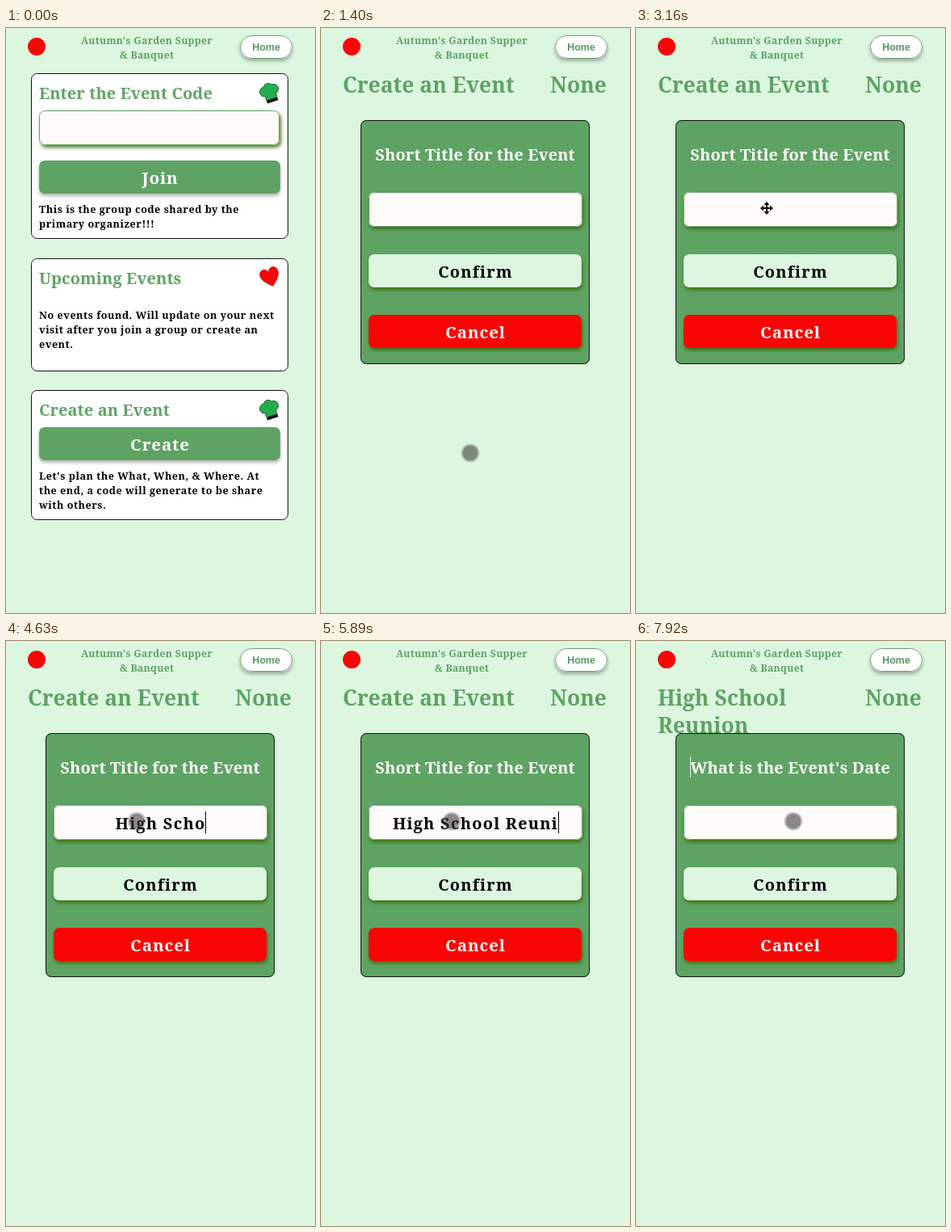
These frames come from a looping animation (383x724 px, 7990 ms). An HTML page with a canvas:

```html
<!DOCTYPE html>
<html lang="en">
<head>
<meta charset="utf-8">
<title>Event planner</title>
<style>
html, body { margin: 0; width: 100%; height: 100%; overflow: hidden; background: #dcf6e0; }
canvas { display: block; }
</style>
</head>
<body>
<canvas id="stage" width="383" height="724"></canvas>
<script>
const ctx = document.getElementById('stage').getContext('2d');
const LOOP = 7990;
const MINT = '#dcf6e0', GREEN = '#5ea364', SNOW = '#fffafa', RED = '#fa0505';
const OLIVE = 'rgba(58,105,0,.85)', SOFT = 'rgba(0,0,0,.3)';
const SERIF = '"Noto Serif", serif';

// size and letter spacing of each text style
const STYLES = {
  brand: [12.3, 0.25], heading: [20, 0.1], body: [12.6, 0.53],
  button: [20.5, 0.9], entry: [20, 1.2], page: [26.5, 0], home: [12.5, 0]
};

// moment at which each letter is typed
const TITLE = 'High School Reunion';
const KEYS = [3290, 3430, 3630, 3700, 3830, 4230, 4300, 4440, 4630, 4830,
  4970, 5090, 5210, 5400, 5560, 5760, 5890, 6030, 6100];

// pointer path: time, x, y
const PATH = [
  [190, 255, 693], [400, 238, 632], [600, 210, 568], [800, 191, 535], [940, 185, 526],
  [1540, 185, 526], [1680, 166, 440], [1820, 131, 340], [1890, 125, 312], [1960, 130, 276],
  [2020, 150, 248], [2150, 159, 230], [2290, 162, 223],
  [7030, 162, 223], [7170, 165, 252], [7300, 171, 296], [7370, 173, 309],
  [7580, 173, 309], [7720, 182, 268], [7850, 192, 235], [7920, 195, 223]
];

const within = (t, from, to) => t >= from && t < to;

function setStyle(name) {
  const [size, spacing] = STYLES[name];
  const family = name === 'home' ? '"Liberation Sans", Arial, sans-serif' : SERIF;
  ctx.font = `bold ${size}px ${family}`;
  ctx.letterSpacing = spacing + 'px';
}

function text(str, x, y, style, color, align = 'left') {
  setStyle(style);
  ctx.fillStyle = color;
  ctx.textAlign = align;
  ctx.fillText(str, x, y);
}

function lines(list, x, y, style, color, step, align) {
  list.forEach((str, i) => text(str, x, y + i * step, style, color, align));
}

function box(x, y, w, h, fill, { stroke, shadow, dx = 0, dy = 3, radius = 7 } = {}) {
  ctx.save();
  ctx.beginPath();
  ctx.roundRect(x, y, w, h, radius);
  if (shadow) {
    Object.assign(ctx, { shadowColor: shadow, shadowBlur: 4, shadowOffsetX: dx, shadowOffsetY: dy });
  }
  ctx.fillStyle = fill;
  ctx.fill();
  ctx.restore();
  if (stroke) {
    ctx.beginPath();
    ctx.roundRect(x + 0.5, y + 0.5, w - 1, h - 1, radius);
    ctx.strokeStyle = stroke;
    ctx.lineWidth = 1;
    ctx.stroke();
  }
}

function disc(x, y, r, fill) {
  ctx.beginPath();
  ctx.arc(x, y, r, 0, Math.PI * 2);
  ctx.fillStyle = fill;
  ctx.fill();
}

function tilted(x, y, draw) {
  ctx.save();
  ctx.translate(x, y);
  ctx.rotate(-0.32);
  draw();
  ctx.restore();
}

function hat(x, y) {
  tilted(x, y, () => {
    for (const [grow, color] of [[0.8, '#17552c'], [0, '#24ad4e']]) {
      disc(-6, -3, 5.5 + grow, color);
      disc(0, -6, 5.5 + grow, color);
      disc(6, -3, 5.5 + grow, color);
      ctx.fillRect(-6.5 - grow, -3, 13 + 2 * grow, 11);
    }
    ctx.fillStyle = '#111';
    ctx.fillRect(-7, 8, 14, 4);
  });
}

function heart(x, y) {
  tilted(x, y, () => {
    ctx.beginPath();
    ctx.moveTo(0, 13);
    ctx.bezierCurveTo(-7, 7, -12, 2, -11.5, -4);
    ctx.bezierCurveTo(-11, -11, -2, -12, 0, -5);
    ctx.bezierCurveTo(2, -12, 11, -11, 11.5, -4);
    ctx.bezierCurveTo(12, 2, 7, 7, 0, 13);
    ctx.fillStyle = RED;
    ctx.fill();
    ctx.strokeStyle = '#a01010';
    ctx.lineWidth = 0.6;
    ctx.stroke();
  });
}

function header() {
  disc(38, 23, 11, RED);
  lines(["Autumn's Garden Supper", '& Banquet'], 174.5, 20, 'brand', GREEN, 18, 'center');
  box(290, 9, 65, 29, '#fff', { stroke: '#6f9e74', shadow: SOFT, radius: 14 });
  text('Home', 322.5, 28, 'home', '#5b9563', 'center');
}

function card(y, h, title, bodyY, body) {
  box(31, y, 319, h, '#fff', { stroke: '#111' });
  text(title, 41, y + 32, 'heading', GREEN);
  lines(body, 41, bodyY, 'body', '#000', 18);
}

function button(label, x, y, w, fill, color, shadow, style = 'button') {
  box(x, y, w, 41, fill, { shadow, dx: shadow === OLIVE ? 1 : 0 });
  text(label, x + w / 2 + 0.5, y + 29, style, color, 'center');
}

function homePage() {
  card(56, 205, 'Enter the Event Code', 229,
    ['This is the group code shared by the', 'primary organizer!!!']);
  box(41, 102, 298, 43, SNOW, { stroke: GREEN, shadow: OLIVE, dx: 2 });
  button('Join', 41, 164, 299, GREEN, SNOW, SOFT);
  hat(327, 80);
  card(285, 140, 'Upcoming Events', 360,
    ['No events found. Will update on your next', 'visit after you join a group or create an', 'event.']);
  heart(327, 307);
  card(448, 161, 'Create an Event', 559,
    ["Let's plan the What, When, & Where. At", 'the end, a code will generate to be share', 'with others.']);
  button('Create', 41, 494, 299, GREEN, SNOW, SOFT);
  hat(327, 472);
}

function formPage(t) {
  const saved = t >= 7540;
  const focused = within(t, 2420, 7540);
  lines(saved ? ['High School', 'Reunion'] : ['Create an Event'], 27, 80, 'page', GREEN, 34);
  text('None', 284, 80, 'page', GREEN);
  box(49, 114, 284, 302, GREEN, { stroke: '#111' });
  text(saved ? "What is the Event's Date" : 'Short Title for the Event',
    191, 164, 'heading', SNOW, 'center');
  if (saved) {
    ctx.fillStyle = MINT;
    ctx.fillRect(67, 143, 1, 26);
  }

  box(59, 203, 265, 43, SNOW, { stroke: focused ? '#86a98a' : GREEN, shadow: OLIVE, dx: 1 });
  button('Confirm', 59, 280, 264, MINT, '#000', OLIVE, 'entry');
  button('Cancel', 59, 355, 264, RED, SNOW, OLIVE);

  const typed = saved ? '' : TITLE.slice(0, KEYS.filter(key => key <= t).length);
  text(typed, 191.5, 233, 'entry', '#000', 'center');
  if (within(t, 2420, 2950) || within(t, 3290, 6630)) {
    ctx.fillStyle = '#000';
    ctx.fillRect(Math.round(191.5 + ctx.measureText(typed).width / 2), 211, 1, 27);
  }
}

function moveArrows(x, y) {
  ctx.save();
  ctx.translate(x, y);
  ctx.fillStyle = '#000';
  for (let i = 0; i < 4; i++) {
    ctx.fillRect(-1, -6, 2, 6);
    ctx.beginPath();
    ctx.moveTo(0, -8);
    ctx.lineTo(3.5, -4);
    ctx.lineTo(-3.5, -4);
    ctx.fill();
    ctx.rotate(Math.PI / 2);
  }
  ctx.restore();
}

function pointerAt(t) {
  const next = PATH.findIndex(point => point[0] > t);
  if (next < 0) return PATH[PATH.length - 1].slice(1);
  const [t0, x0, y0] = PATH[next - 1];
  const [t1, x1, y1] = PATH[next];
  const k = (t - t0) / (t1 - t0);
  return [x0 + (x1 - x0) * k, y0 + (y1 - y0) * k];
}

function pointer(t) {
  if (t < 190) return;
  const [x, y] = pointerAt(t);
  if (within(t, 3160, 4030)) {
    moveArrows(x, y);
    return;
  }
  const clicking = within(t, 1150, 1400) || within(t, 2290, 2420) || within(t, 7400, 7540);
  if (clicking) {
    disc(x, y, 15, 'rgba(215,225,20,.65)');
    disc(x, y, 10.5, 'rgba(120,140,0,.6)');
  } else {
    disc(x, y, 11.5, 'rgba(90,90,90,.3)');
    disc(x, y, 9.5, 'rgba(40,40,40,.4)');
  }
}

function draw(now) {
  const t = now % LOOP;
  ctx.fillStyle = MINT;
  ctx.fillRect(0, 0, 383, 724);
  header();
  if (t < 1400) homePage();
  else formPage(t);
  pointer(t);
}

const start = performance.now();
function tick() {
  draw(performance.now() - start);
  requestAnimationFrame(tick);
}
tick();
</script>
</body>
</html>
```
